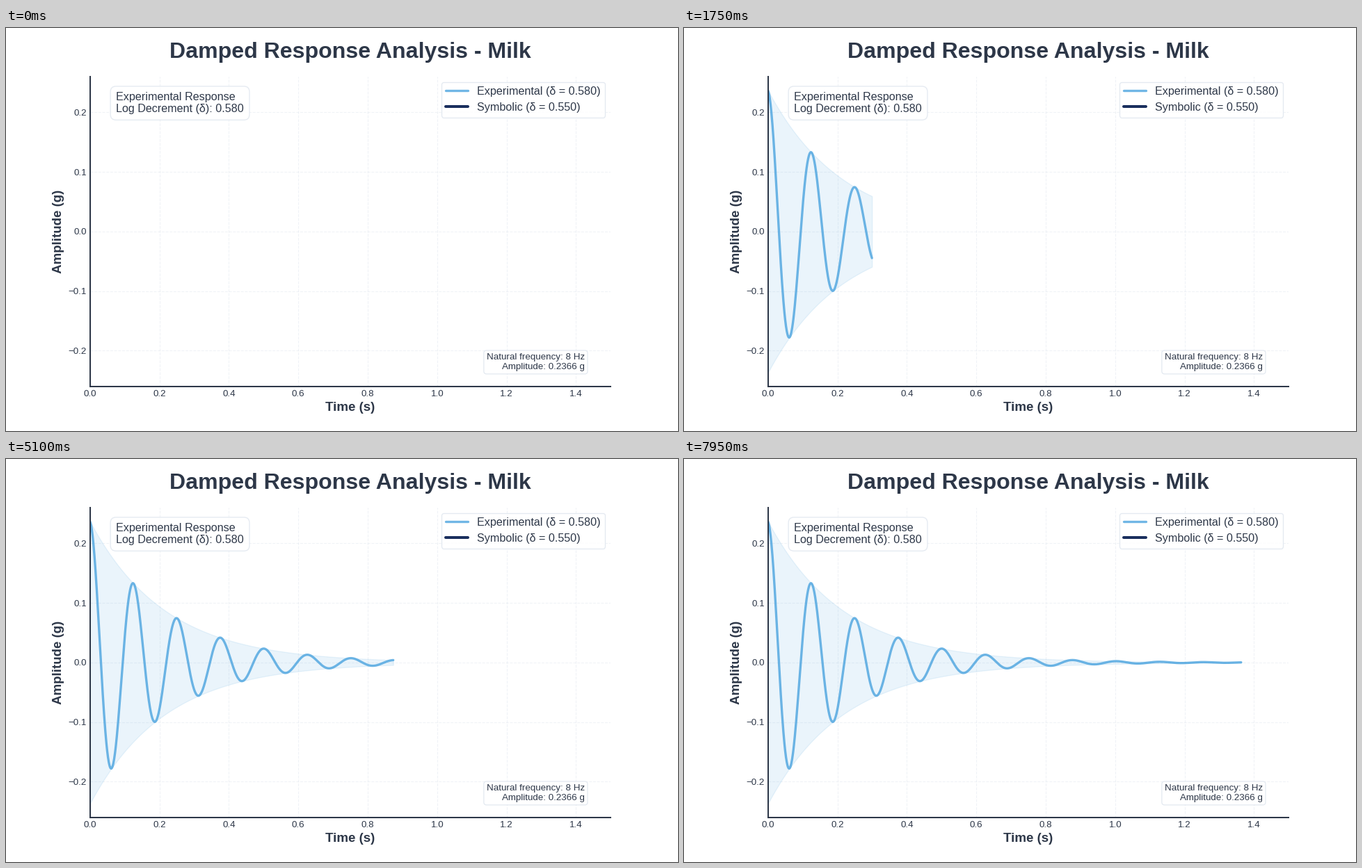
A matplotlib script that plays this animation: 966x580 px, repeating every 8000 ms.

```python
import numpy as np
import matplotlib.pyplot as plt
from matplotlib.animation import FuncAnimation

plt.rcParams["font.family"] = ["Liberation Sans", "DejaVu Sans"]

INK = "#2d3748"
EDGE = "#e2e8f0"
BLUE = "#3498db"
NAVY = "#1a2f5e"

DPI = 96.6
AMP, FREQ, DELTA = 0.2366, 8, 0.58
T_END, SAMPLES = 1.5, 2000
FRAMES, FULL_RUN, STEP_MS = 160, 175, 50

zeta = DELTA / np.hypot(2 * np.pi, DELTA)
omega = 2 * np.pi * FREQ
t = np.linspace(0, T_END, SAMPLES)
envelope = AMP * np.exp(-zeta * omega * t)
wave = envelope * np.cos(omega * np.sqrt(1 - zeta**2) * t)

# the small surplus guards against rounding down to one pixel less
fig, ax = plt.subplots(figsize=(966.01 / DPI, 580.01 / DPI), dpi=DPI)
fig.set_facecolor("white")
ax.set_axisbelow(True)
ax.set_xlim(0, T_END)
ax.set_ylim(-1.1 * AMP, 1.1 * AMP)
ax.set_xticks(np.arange(0, 1.5, 0.2))
ax.set_yticks(np.arange(-2, 3) / 10)
ax.tick_params(length=0, labelsize=10, labelcolor=INK)
ax.grid(True, linestyle="--", color=EDGE, alpha=0.5, linewidth=0.8)
for side in ("top", "right"):
    ax.spines[side].set_visible(False)
for side in ("left", "bottom"):
    ax.spines[side].set(color=INK, linewidth=1.5)

ax.set_title("Damped Response Analysis - Milk", fontsize=24,
             fontweight="bold", color=INK, pad=20)
ax.set_xlabel("Time (s)", fontsize=14, fontweight="bold", color=INK)
ax.set_ylabel("Amplitude (g)", fontsize=14, fontweight="bold", color=INK)


def note(x, y, text, size, pad, ha, va):
    ax.text(x, y, text, transform=ax.transAxes, fontsize=size, color=INK,
            ha=ha, va=va, bbox=dict(boxstyle=f"round,pad={pad}", fc="white",
                                    ec=EDGE, alpha=0.9))


note(0.05, 0.95, "Experimental Response\nLog Decrement (δ): 0.580",
     12, 0.5, "left", "top")
note(0.95, 0.05, "Natural frequency: 8 Hz\nAmplitude: 0.2366 g",
     10, 0.3, "right", "bottom")

line, = ax.plot([], [], color=BLUE, alpha=0.7, lw=2.5,
                solid_capstyle="round", label="Experimental (δ = 0.580)")
ax.plot([], [], color=NAVY, lw=3, solid_capstyle="round",
        label="Symbolic (δ = 0.550)")
legend = ax.legend(loc="upper right", fontsize=12, labelcolor=INK,
                   framealpha=0.9, edgecolor=EDGE)

fill = None


def update(i):
    global fill
    n = i * SAMPLES // FULL_RUN
    line.set_data(t[:n], wave[:n])
    if fill is not None:
        fill.remove()
    fill = ax.fill_between(t[:n], -envelope[:n], envelope[:n],
                           color=BLUE, alpha=0.1, linewidth=1)
    return line, fill


anim = FuncAnimation(fig, update, frames=FRAMES, interval=STEP_MS,
                     repeat=True, repeat_delay=0)
plt.show()
```
